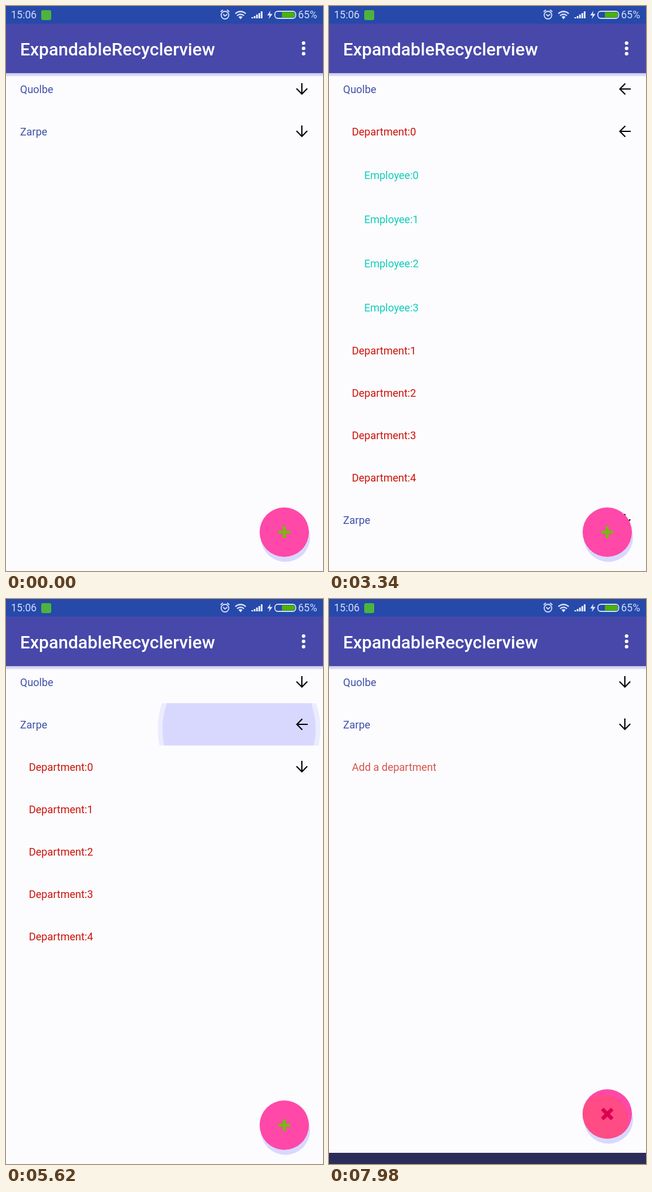
These frames come from a looping animation (540x960 px, 8 s). An HTML page:

```html
<!DOCTYPE html>
<html lang="en">
<head>
<meta charset="utf-8">
<title>ExpandableRecyclerview</title>
<style>
  html, body { margin: 0; width: 100%; height: 100%; overflow: hidden; background: #fcfcff; }
  svg { display: block; }
  text { font-family: Roboto, sans-serif; font-size: 18px; }
  .company { fill: #4050a8; }
  .company.moving { fill: #5a6cbc; }
  .department { fill: #cc1208; }
  .department.moving { fill: #d82440; }
  .employee { fill: #10ccb8; }
  .arrow { fill: none; stroke: #000; stroke-width: 2.1; }
  .moving + .arrow { stroke: #282838; }
  .status text { font-size: 17.5px; fill: #d4dcfa; }
  .line { fill: none; stroke: #d4dcfa; stroke-width: 1.8; }
  .solid { fill: #e0e6ff; }
  .title { font-size: 30px; font-weight: 500; fill: #fff; }
  #icon { stroke: #78b810; }
  #icon.active { stroke: #dc0050; }
</style>
</head>
<body>
<svg id="stage" width="540" height="960" viewBox="0 0 540 960">
  <defs>
    <linearGradient id="shade" x2="0" y2="1">
      <stop stop-color="#30307a" stop-opacity=".26"/>
      <stop offset=".75" stop-color="#3030d8" stop-opacity=".14"/>
      <stop offset="1" stop-color="#3030d8" stop-opacity="0"/>
    </linearGradient>
    <clipPath id="disc"><circle r="42"/></clipPath>
  </defs>
  <rect width="540" height="960" fill="#fcfcff"/>
  <svg id="touch" width="540" height="72"><circle/></svg>
  <g id="list"></g>

  <rect y="114" width="540" height="6" fill="url(#shade)"/>
  <rect y="30" width="540" height="84" fill="#4848aa"/>
  <text class="title" x="24" y="84">ExpandableRecyclerview</text>
  <g fill="#fff">
    <circle cx="507" cy="63" r="3.1"/><circle cx="507" cy="72" r="3.1"/><circle cx="507" cy="81" r="3.1"/>
  </g>

  <g class="status">
    <rect width="540" height="30" fill="#2649aa"/>
    <text x="8.5" y="21">15:06</text>
    <rect x="60" y="7" width="17" height="17" rx="3" fill="#4cb43c"/>
    <g class="line">
      <circle cx="373" cy="15.5" r="6.5"/>
      <path d="M370 14l3 3 4-3M365.500 10l4-3.500M380.500 10l-4-3.500"/>
      <path d="M390.500 13q9-7.500 18 0M393.500 16.500q6-5 12 0" stroke-width="2.2"/>
    </g>
    <path class="solid" d="M396 18.500q3.500-2.500 7 0l-3.500 4z"/>
    <path class="solid" d="M418 21v-2h3v2zM422 21v-4h3v4zM426 21v-6.500h3v6.500zM430 21v-9h3v9zM434 21v-12h3v12z"/>
    <path class="solid" d="M450.500 8l-5.500 8h4l-1.500 6 6.500-8.500h-4.500z"/>
    <rect x="458" y="9" width="35.500" height="12" rx="5" class="line" stroke-width="1.300"/>
    <path d="M470 10.500h18q4 0 4 4.500t-4 4.500h-18z" fill="#48b400"/>
    <text x="497.500" y="21">65%</text>
  </g>

  <g id="fab">
    <circle cx="2" cy="8.500" r="42" fill="#d8d8ff"/>
    <circle r="42" fill="#ff48a8"/>
    <g clip-path="url(#disc)"><circle id="press" cx="-6" cy="9" fill="#ff4c84"/></g>
    <path id="icon" d="M-10 0h20M0-10v20" stroke-width="5.200"/>
  </g>
  <rect id="snack" width="540" height="72" fill="#2c2c58"/>
</svg>
<script>
const LOOP = 8000, MOVE = 250, FADE = 120, TURN = 215, ROW = 72, BLOCK = 300;
// Tap times: first company, its department, then the second company.
const open1 = 1430, openDep1 = 2513, closeDep1 = 3470, close1 = 4433;
const open2 = 5270, openDep2 = 6020, close2 = 7010, add = 7894;

const NS = "http://www.w3.org/2000/svg";
const $ = id => document.getElementById(id);
const clamp = v => Math.min(1, Math.max(0, v));
const part = (t, start, length) => clamp((t - start) / length);
const ease = (t, start) => (1 - Math.cos(Math.PI * part(t, start, MOVE))) / 2;
const shown = (start, end) => t => part(t, start, FADE) - part(t, end, FADE);
const turned = (start, end) => t => 90 * (part(t, start, TURN) - part(t, end, TURN));

function node(parent, tag, attrs) {
  const el = document.createElementNS(NS, tag);
  for (const key in attrs) el.setAttribute(key, attrs[key]);
  return parent.appendChild(el);
}

const rows = [];
function addRow(type, label, x, y, alpha, angle) {
  const g = node($("list"), "g", {});
  const text = node(g, "text", { x, y: 7, class: type });
  text.textContent = label;
  const arrow = angle && node(g, "path", { class: "arrow", d: "M0-10V8M-9.200-.7L0 8.500 9.200-.7" });
  rows.push({ g, text, arrow, y, alpha, angle });
}

const always = () => 1;
const depShift1 = t => BLOCK * (ease(t, openDep1) - ease(t, closeDep1 + FADE));
const depShift2 = t => BLOCK * ease(t, openDep2);

function addBranch(top, alpha, employeeAlpha, shift, angle) {
  for (let i = 0; i < 5; i++)
    addRow("department", "Department:" + i, 39, t => top + i * ROW + (i ? shift(t) : 0), alpha, i ? null : angle);
  for (let i = 0; i < 4; i++)
    addRow("employee", "Employee:" + i, 60, () => top + 73.5 + i * 75, employeeAlpha);
}

addRow("company", "Quolbe", 24, () => 141, always, turned(open1, close1));
addBranch(213, shown(open1 + MOVE, close1), shown(openDep1 + MOVE, closeDep1), depShift1, turned(openDep1, closeDep1));
addRow("company", "Zarpe", 24,
  t => 213 + 5 * ROW * (ease(t, open1) - ease(t, close1 + FADE)) + depShift1(t),
  always, turned(open2, close2));
addBranch(285, shown(open2, close2), shown(openDep2 + MOVE, close2), depShift2, turned(openDep2, LOOP));
addRow("department", "Add a department", 39, () => 285, shown(add, LOOP));

// Each touch: time, top of its row, centre x, centre y inside the row.
const touches = [
  [open1, 105, 390, 38], [openDep1, 177, 388, 50], [closeDep1, 177, 386, 44], [close1, 105, 393, 38],
  [open2, 177, 397, 44], [openDep2, 249, 392, 42], [close2, 177, 390, 42]
];
const fillStops = [[100, "#b3b3a9"], [188, "#c4c4d6"], [350, "#d8d8ff"], [480, "#fcfcff"]];
const edgeStops = [[100, "#b3b3a9"], [188, "#d3d3cf"], [350, "#ececff"], [480, "#fcfcff"]];

function colorAt(stops, age) {
  const i = stops.findIndex(stop => age < stop[0]);
  if (i <= 0) return stops[0][1];
  const [a, from] = stops[i - 1], [b, to] = stops[i];
  return `color-mix(in srgb, ${to} ${100 * (age - a) / (b - a)}%, ${from})`;
}

const touch = $("touch"), ripple = touch.firstElementChild;
function drawTouch(t) {
  const hit = touches.find(([start]) => t > start + 9 && t < start + 480);
  touch.style.display = hit ? "" : "none";
  if (!hit) return;
  const [start, top, cx, cy] = hit, age = t - start;
  const radius = 150 * (1 - Math.exp((9 - age) / 133));
  const edge = 18 * part(age, 100, 80) - 10 * part(age, 188, 160);
  touch.setAttribute("y", top);
  ripple.setAttribute("cx", cx);
  ripple.setAttribute("cy", cy);
  ripple.setAttribute("r", Math.max(0, radius - edge / 2));
  ripple.style.fill = colorAt(fillStops, age);
  ripple.style.stroke = colorAt(edgeStops, age);
  ripple.style.strokeWidth = edge;
}

function drawRow(row, t) {
  const y = row.y(t), alpha = row.alpha(t);
  row.g.style.display = alpha > 0 ? "" : "none";
  row.g.setAttribute("opacity", alpha);
  row.g.setAttribute("transform", `translate(0 ${Math.round(y)})`);
  row.text.classList.toggle("moving", y !== row.y(t - 1));
  if (row.arrow) row.arrow.setAttribute("transform", `translate(504) rotate(${row.angle(t)})`);
}

function drawFab(t) {
  const rise = Math.round(72 * ease(t, add)), tapped = t >= add;
  $("snack").setAttribute("y", 960 - rise);
  $("fab").setAttribute("transform", `translate(474 ${894 - rise})`);
  $("press").setAttribute("r", 0.48 * Math.max(0, t - add));
  $("icon").classList.toggle("active", tapped);
  $("icon").setAttribute("transform", tapped ? "rotate(45) scale(1.200)" : "");
}

const begin = performance.now();
function draw() {
  const t = (performance.now() - begin) % LOOP;
  rows.forEach(row => drawRow(row, t));
  drawTouch(t);
  drawFab(t);
  requestAnimationFrame(draw);
}
draw();
</script>
</body>
</html>
```
